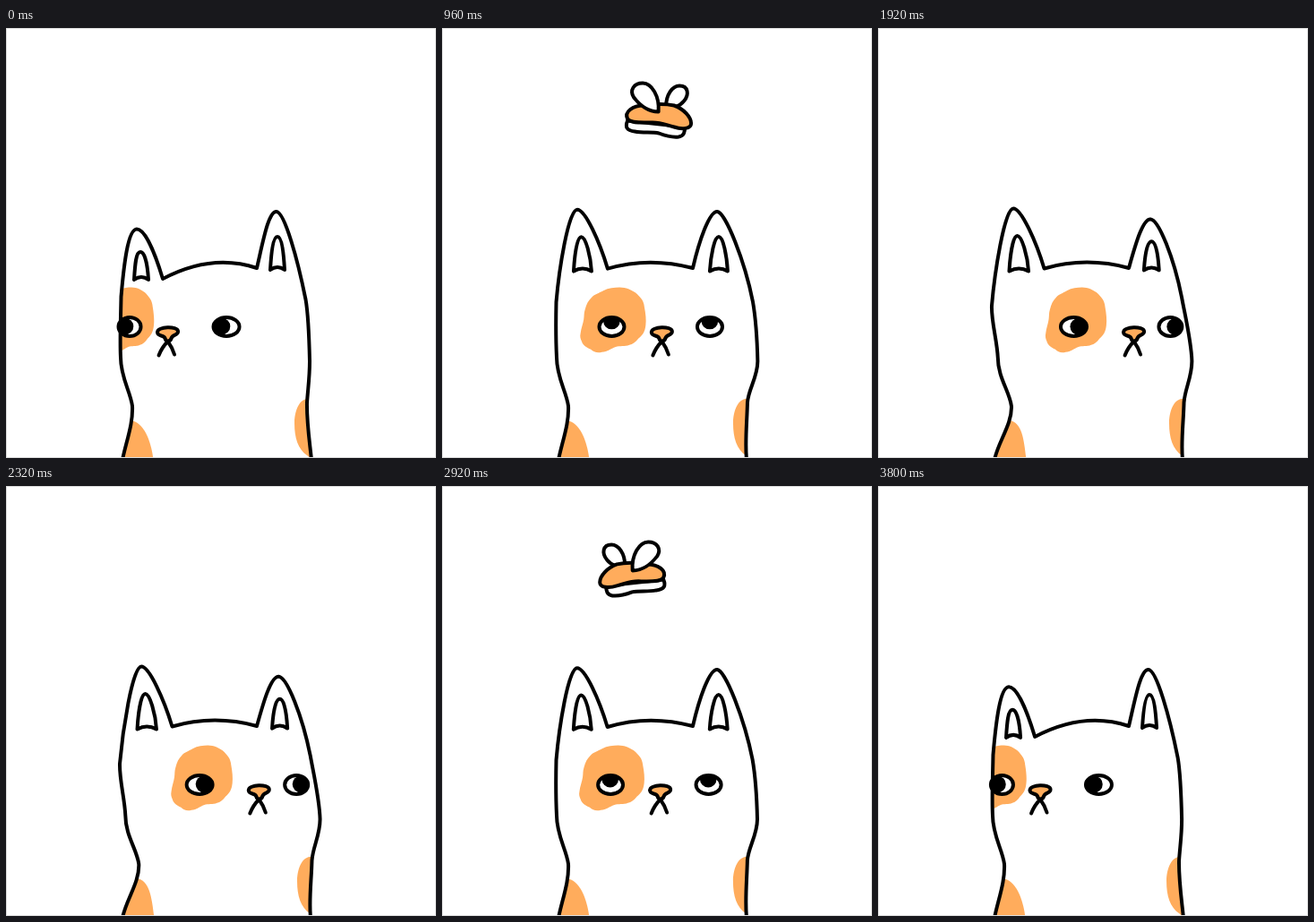
Recreate the animation shown at these times as an HTML page. Size 480 px wide and 480 px high, loop 3840 ms.

```html
<!DOCTYPE html>
<html lang="en">
<head>
<meta charset="utf-8">
<title>Cat watching a bee</title>
<style>
html, body { margin: 0; width: 100%; height: 100%; overflow: hidden; background: #fff; }
svg { display: block; width: 100vw; height: 100vh; }
.line { fill: none; stroke: #000; stroke-width: 4; stroke-linecap: round; stroke-linejoin: round; }
.white { fill: #fff; }
.orange { fill: #ffac5c; }
</style>
</head>
<body>
<svg viewBox="0 0 480 480">
  <defs>
    <clipPath id="inBody"><path id="bodyClip"/></clipPath>
    <clipPath id="inEyeL"><ellipse id="clipL" cy="333.5"/></clipPath>
    <clipPath id="inEyeR"><ellipse id="clipR" cy="333.5"/></clipPath>
  </defs>
  <g id="bee">
    <path class="line white" d="M8 27C8 14 15 4 23 4C33 4 34 14 28 21Q24 26 18 28Z"/>
    <path class="line white" d="M-35 43C-38 50 -36 54 -27 55C-17 57 -8 55 0 57C8 60 14 62 22 61C28 60 29 56 29 50Z"/>
    <path class="line orange" d="M-35 41C-39 33 -29 26 -17 26C-4 24 8 24 17 26C28 30 36 39 36 46C36 52 26 53 17 50C8 48 2 44 -10 45C-20 45 -31 46 -35 41Z"/>
    <path class="line white" d="M-.5 33C-12 33 -22 25 -28 17C-33 9 -28 1 -18 1C-8 1 1 16 -.5 33Z"/>
  </g>
  <path id="body" class="white"/>
  <g class="orange" clip-path="url(#inBody)">
    <path id="spotL"/>
    <path id="spotR" d="M348 414L336 414C327 415 322 428 322 441C322 458 326 470 336 477L342 482L348 482Z"/>
    <path id="patch" d="M.6 0C.7 0 .78 .04 .84 .08C.92 .15 .97 .2 .98 .3C1 .4 1.01 .5 1 .58C.99 .68 .95 .74 .89 .78C.84 .84 .8 .87 .75 .88C.68 .91 .6 .89 .54 .91C.46 .94 .42 .98 .33 .99C.26 1.01 .2 .99 .16 .95C.09 .92 .03 .88 .02 .83C0 .79 -.01 .75 0 .71C.01 .62 .04 .56 .05 .49C.06 .43 .05 .4 .07 .34C.09 .26 .12 .2 .175 .15C.22 .1 .28 .09 .35 .05C.43 .01 .52 0 .6 0Z"/>
  </g>
  <path id="outline" class="line"/>
  <path id="earL" class="line"/>
  <path id="earR" class="line"/>
  <ellipse id="eyeL" class="line white" cy="333.5"/>
  <circle id="pupilL" r="9.3" clip-path="url(#inEyeL)"/>
  <ellipse id="eyeR" class="line white" cy="333.5"/>
  <circle id="pupilR" r="9.3" clip-path="url(#inEyeR)"/>
  <g id="nose">
    <path class="line" d="M-10 27Q-6.5 18 -.5 12L.5 12Q5 18 7.5 26"/>
    <path class="line orange" d="M-11.5 1C-11.5 -5.5 11 -6 11.5 0C12 5 5 3 4 8Q3 11 0 11Q-2 11 -3 8C-4 4 -12 6 -11.5 1Z"/>
  </g>
  <rect x=".5" y=".5" width="479" height="479" fill="none" stroke="#dcdcdc"/>
</svg>
<script>
const LOOP = 3840;
const STOPS = [0, 0.365, 0.635, 1];
const $ = id => document.getElementById(id);
const set = (id, attrs) => {
  for (const name in attrs) $(id).setAttribute(name, attrs[name]);
};
const clamp = v => Math.max(0, Math.min(1, v));
const ease = u => 0.3 * (1 - Math.cos(Math.PI * u)) + 0.4 * u;

// Head turn: 0 looks left, 1 looks right
function turnAt(t) {
  const there = ease(clamp(t / 1610));
  const back = ease(clamp((t - 2280) / 1540));
  const drift = 0.02 * Math.sin(Math.PI * clamp((t - 1520) / 800));
  return there - back + drift;
}

// Value between four key poses
function pose(p, ...v) {
  const i = p < STOPS[1] ? 0 : p < STOPS[2] ? 1 : 2;
  return v[i] + (v[i + 1] - v[i]) * (p - STOPS[i]) / (STOPS[i + 1] - STOPS[i]);
}

function drawBody(k) {
  const l1x = k(128.5, 127.5, 127.5, 127), l1y = k(300, 306, 306, 310);
  const l2 = k(128, 128, 128, 133.5), l3 = k(141, 141, 141, 148.5);
  const tx = k(146, 149, 151, 151), ty = k(224.5, 211, 202.5, 201.5);
  const bx = k(175, 181, 185, 185.5), by = k(280, 274, 268.5, 268.5);
  const rx = k(302, 306, 307.5, 304.5), ry = k(205, 204.5, 205, 213);
  const r1x = k(334.5, 342, 347, 339.5), r1y = k(303, 306, 305, 301);
  const r2 = k(339, 346.5, 352.5, 350.5), r3 = k(336, 339.5, 341, 341.5);
  const r4 = k(341, 340, 340, 340);
  const d = `M130 482C134 462 ${l3 + 1} 442 ${l3} 422
    C${l3 - 2} 406 ${l2} 390 ${l2} 368
    C${l2 - 1} 348 ${l1x - 0.5} 328 ${l1x} ${l1y}
    C${l1x + 3} ${l1y - 35} ${tx - 10} ${ty} ${tx} ${ty}
    C${tx + 9} ${ty} ${bx - 9} ${by - 30} ${bx} ${by}
    Q${k(230, 230, 231, 232)} ${k(251, 253, 255, 255)} 280 268
    C287 ${k(238, 238, 238, 243)} ${rx - 9} ${ry - 1} ${rx} ${ry}
    C${rx + 9} ${ry + 1} ${r1x - 9} ${r1y - 45} ${r1x} ${r1y}
    C${r1x + 3} ${r1y + 17} ${r2 - 0.5} 350 ${r2} 372
    C${r2} 390 ${r3 + 1} 403 ${r3} 418
    C${r3 - 0.5} 440 ${r4 - 2} 462 ${r4} 482`;
  for (const id of ["body", "bodyClip", "outline"]) set(id, { d });
}

function innerEar(id, x, y, lx, rx, by) {
  const mid = (lx + rx) / 2;
  set(id, { d: `M${lx} ${by}C${lx + 1} ${by - 17} ${x - 5} ${y} ${x} ${y}
    C${x + 5} ${y} ${rx - 1} ${by - 17} ${rx} ${by}Q${mid} ${by - 6} ${lx} ${by}Z` });
}

function drawEye(side, cx, rx, dx, dy) {
  set("eye" + side, { cx, rx, ry: 10.5 });
  set("clip" + side, { cx, rx, ry: 10.5 });
  set("pupil" + side, { cx: cx + dx, cy: 333 + dy });
}

function drawCat(p) {
  const k = (...v) => pose(p, ...v);
  drawBody(k);
  innerEar("earL", k(150, 153, 155.5, 155.5), k(250, 239, 233, 232),
    k(143, 145, 147, 146.5), k(159, 164, 167, 168), k(281, 275, 271.5, 271.5));
  innerEar("earR", k(303, 306.5, 309, 305.5), k(233, 233, 233, 238),
    k(295, 297, 299, 297), k(311, 315, 319, 314), k(270, 271, 271.5, 270.5));

  const dx = k(-5, -4, 0, 5), dy = k(0, -3.5, -6, 0);
  drawEye("L", k(138, 168, 190, 217), k(12.5, 13.5, 14, 14.5), dx, dy);
  drawEye("R", k(246, 277.5, 299.5, 325), k(14.5, 14.5, 14, 13), dx, dy);
  set("nose", { transform: `translate(${k(180.5, 218.5, 246, 283.5)} 338.5)` });

  const left = k(103, 136.5, 155, 185.5), right = k(165, 201, 228, 253.5);
  set("patch", { transform: `translate(${left} 289.5) scale(${right - left} 73)` });
  const sx = k(139, 139, 139, 146), ex = k(164, 164, 164, 165);
  set("spotL", { d: `M${sx} 438C${sx + 15} 440 ${ex - 2} 461 ${ex + 0.5} 482L120 482L120 438Z` });
  set("spotR", { transform: `translate(${k(0, 2, 3, 3)} 0)` });
}

// Arched flight: right in the first half, mirrored back in the second
function drawBee(t) {
  const back = t >= LOOP / 2;
  const dir = back ? -1 : 1;
  const dt = t - (back ? 2880 : 960);
  const x = (back ? 237 : 241.5) + dir * (0.52 * dt + 9 * Math.tanh(dt / 100));
  const y = 60.5 + 0.00054 * dt * dt;
  set("bee", {
    transform: `translate(${x} ${y}) scale(${dir} 1)`,
    visibility: Math.abs(dt) < 540 ? "visible" : "hidden"
  });
}

const start = performance.now();
function frame() {
  const t = (performance.now() - start) % LOOP;
  drawCat(turnAt(t));
  drawBee(t);
  requestAnimationFrame(frame);
}
frame();
</script>
</body>
</html>
```
